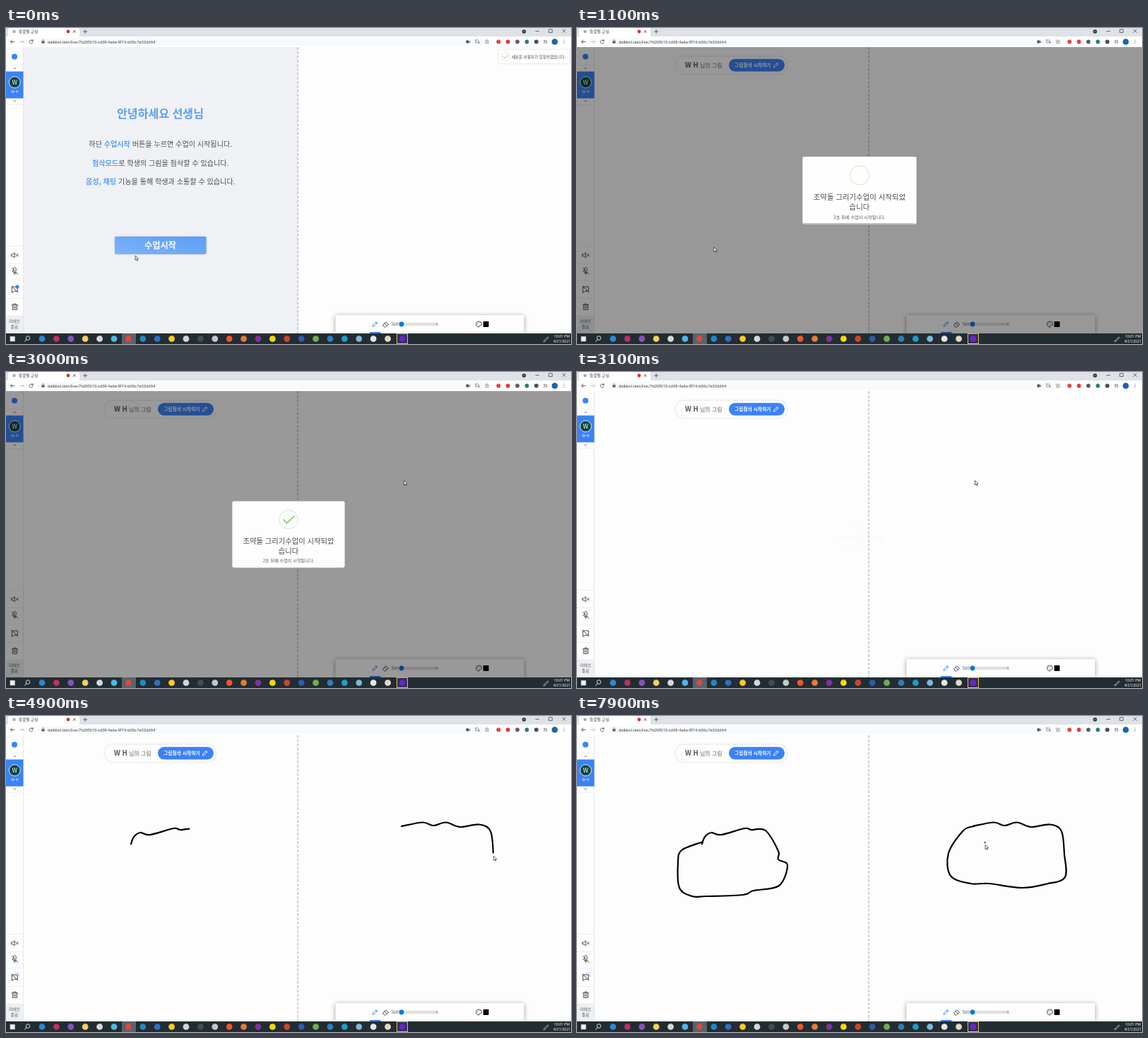
An HTML page that plays this animation: 800 px wide and 447 px high, repeating every 8000 ms.

```html
<!DOCTYPE html>
<html lang="ko">
<head>
<meta charset="utf-8">
<title>Live class</title>
<style>
html, body { margin: 0; height: 100%; overflow: hidden; background: #fdfdfe; }
svg { display: block; width: 100vw; height: 100vh; font-family: 'Noto Sans CJK KR', 'Noto Sans CJK', sans-serif; }
text { white-space: pre; }
.line { fill: none; stroke-linecap: round; stroke-linejoin: round; }
.soft { filter: drop-shadow(0 .8px 1px #0003); }
.deep { filter: drop-shadow(0 1px 3px #0006); }
</style>
</head>
<body>
<svg id="stage" viewBox="0 0 800 447" preserveAspectRatio="none"></svg>
<script>
const BLUE = '#3b82f6', SKY = '#5a9ff0', DARK = '#4a4d52', PAPER = '#fdfdfe', GREEN = '#86cc5c', PALE = '#d3ebc0';

const rect = (x, y, w, h, fill, more = '') =>
  `<rect x="${x}" y="${y}" width="${w}" height="${h}" fill="${fill}" ${more}/>`;
const circle = (x, y, r, fill, more = '') =>
  `<circle cx="${x}" cy="${y}" r="${r}" fill="${fill}" ${more}/>`;
const line = (d, color = DARK, w = 1, more = '') =>
  `<path class="line" d="${d}" stroke="${color}" stroke-width="${w}" ${more}/>`;
// y is the vertical middle of the glyphs
const text = (x, y, size, str, fill = DARK, weight = 400, anchor = 'middle', more = '') =>
  `<text x="${x}" y="${y + size * .38}" font-size="${size}" fill="${fill}" font-weight="${weight}" text-anchor="${anchor}" ${more}>${str}</text>`;
const span = str => `<tspan fill="${SKY}" font-weight="700">${str}</tspan>`;
const pencil = (x, y, color) =>
  line(`M${x - 3} ${y + 3}l.6-2.2 4.4-4.4 1.6 1.6-4.4 4.4zm4-5.6l1.6 1.6`, color, .9);

function browser() {
  const tools = ['#e0483e', '#e23c3c', '#5b5f66', '#2d7d6c', '#4a4d52'];
  return rect(0, 0, 800, 12, '#dee1e6') + rect(3, 0, 101, 13, '#fff', 'rx="2"') + rect(0, 12, 800, 15, '#fff') +
    rect(45, 14, 643, 11, '#f8f9fa', 'rx="5.5"') +
    circle(11.5, 5, 2.3, '#a9adb2') + text(18, 5, 5.6, '들꽃별 교실', '#444', 400, 'start') +
    circle(88, 5, 2.4, '#d93025') + line('M95 3.2l3.4 3.4m0-3.4l-3.4 3.4M109.7 5h5m-2.5-2.5v5', '#444', .8) +
    circle(733.5, 5, 2.8, '#333') + line('M732.3 4.5l1.2 1.2 1.2-1.2', '#fff', .6) +
    line('M750 4.5h4.5M769 2h4.4v4.4h-4.4zM788 2l4.4 4.4m0-4.4l-4.4 4.4', '#333', .7) +
    line('M12 19.5H6.5m2.4-2.4l-2.4 2.4 2.4 2.4', '#555', .9) +
    line('M19.5 19.5h5.5m-2.4-2.4l2.4 2.4-2.4 2.4', '#bbb', .9) +
    line('M37.8 18a2.6 2.6 0 1 0 .3 2.4m0-3.9v1.9h-1.9', '#555', .9) +
    rect(50.5, 18.6, 4, 3, '#555') + line('M51.3 18.6v-.8a1.2 1.2 0 0 1 2.4 0v.8', '#555', .6) +
    text(59, 19.5, 5.85, 'dalkkot.test/live/7b20f615-cd38-4a6e-8f19-b05c7e32d694', '#444', 400, 'start', 'font-family="Roboto, sans-serif"') +
    rect(651.5, 17.5, 4, 4, '#555', 'rx=".6"') + line('M656 19.5l1-1v2z', '#555', .6) +
    line('M665 17h3.5m-3.5 0v4h2m2.5-2.5l1 3-2.5-1z', '#666', .7) +
    line('M681 16.7l.8 1.9 2 .1-1.5 1.3.5 2-1.8-1.1-1.8 1.1.5-2-1.5-1.3 2-.1z', '#666', .6) +
    tools.map((c, i) => circle(697.3 + i * 13.4, 19.5, 2.9, c)).join('') +
    line('M761.5 17.6h4m-4 1.8h4m-4 1.8h2m2.2-1.8v2.4', '#555', .7) +
    circle(777, 19.5, 4.3, '#1f62ad') +
    [17, 19.3, 21.6].map(y => circle(790, y, .6, '#555')).join('');
}

function sidebar() {
  const rules = [52, 108, 308.5, 333, 356.5, 382].map(y => rect(0, y, 24, .6, '#e3e5e8')).join('');
  return rect(0, 27, 24.5, 405, PAPER) + rect(24, 27, .8, 405, '#dfe2e6') + rules +
    circle(12, 40.5, 4, BLUE) +
    line('M11 57.3l1.3-.8 1.3.8M11 103l1.3.8 1.3-.8', '#444', .8) +
    rect(0, 61.5, 24.5, 38, BLUE) + circle(12.3, 76.8, 8, '#0b4743', 'stroke="#e8f3f0"') +
    text(12.3, 76.8, 8.5, 'W', '#fff', 500) + text(12.3, 90.3, 5.4, 'W H', '#fff', 500) +
    line('M8 320h1.8l2.4-2.2v7.2l-2.4-2.2H8zM14.2 319.8l3 3.2m0-3.2l-3 3.2') +
    line('M10.8 342v-1.6a1.7 1.7 0 0 1 3.4 0v3.2M10.8 342.2v1.6a1.7 1.7 0 0 0 2.6 1.4M9 343.4a3.5 3.5 0 0 0 5.5 2.8M12.4 347v1.7M8.3 339.6l8.4 8.7') +
    line('M8.7 366h7.6v6.4h-4.8l-2.8 1.8zM8 365.2l9 8.8') +
    line('M8.3 391.8h8.2m-7.2 0v6.6h6.2v-6.6m-4.6 0v-1.6h3v1.6m-2.5 2v2.8m2 0v-2.8') +
    rect(0, 406.5, 24, 25.5, '#eeeff1') +
    text(12, 415, 5.6, '라이브') + text(12, 423, 5.6, '종료');
}

function welcome() {
  const lines = [
    `하단 ${span('수업시작')} 버튼을 누르면 수업이 시작됩니다.`,
    `${span('첨삭모드')}로 학생의 그림을 첨삭할 수 있습니다.`,
    `${span('음성, 채팅')} 기능을 통해 학생과 소통할 수 있습니다.`];
  return '<g id="welcome">' + rect(24.8, 27, 388, 405, '#eff1f4') +
    text(218.5, 121, 16.1, '안녕하세요 선생님', SKY, 700) +
    lines.map((s, i) => text(218.7, 164.5 + i * 26.3, 10.1, s)).join('') +
    rect(154, 295, 129.5, 25, 'url(#btn)', 'rx="2" class="soft"') +
    text(218.5, 307.3, 12.2, '수업시작', '#fff', 700) + '</g>';
}

function lesson() {
  return '<g id="lesson">' + rect(140, 40.5, 157, 24.5, PAPER, 'rx="11" class="soft"') +
    text(153, 52.5, 9.7, 'W H', '#55585e', 700, 'start') + text(174, 52.5, 8, '님의 그림', '#666', 400, 'start') +
    rect(215, 43.7, 79, 17.8, BLUE, 'rx="8.9"') + text(223, 52.5, 6.75, '그림첨삭 시작하기', '#fff', 700, 'start') +
    pencil(281.5, 52.7, '#fff') + '</g>';
}

function toolbar() {
  return rect(466.5, 406, 267, 26, PAPER, 'class="deep"') +
    pencil(522.3, 419, BLUE) + rect(515, 430, 15.5, 2, BLUE) +
    line('M533.8 419.8l4-4 3.8 3.2-4 4h-1.6zm2-2l3.8 3.3') +
    text(545.5, 419, 5.6, 'Size', '#555', 400, 'start') +
    rect(557, 417.8, 53, 2.4, '#eee', 'rx="1.2" stroke="#999" stroke-width=".5"') + circle(560, 419, 3.4, '#0b75e0') +
    text(610.5, 419, 5.4, '5', '#555') +
    line('M669.5 423a4 4 0 1 1 4-4c0 1.7-1 2-2.5 1.8s-1.8.4-1.4 1.2 0 1-.1 1M667.4 418.8h.1M668.8 417h.1M671 417.2h.1') +
    rect(675.7, 415, 7.8, 8, '#000');
}

function taskbar() {
  const colors = ('2a8ad4 c0305f 8a4fc0 f5cf5a d5d8da 4fb8e8 de4b3c 1e88d0 2f6fc4 ffc928 d8d5da 454c52 c3c8cc ' +
    'f0562a e87b30 80319e f5d90a d04525 2a5db0 6fae4a 2f7fb8 18a0c8 7fb8d8 e4e6e8 e3d8c6 6428c4').split(' ');
  const clock = (y, str) => text(787, y, 5.1, str, '#fff', 400, 'middle', 'font-family="Noto Sans, sans-serif"');
  return rect(0, 432, 800, 15, '#222c33') + rect(164, 432, 20, 15, '#58636c') + rect(5.7, 436.3, 7, 7, '#eee') +
    circle(31, 438.6, 2.8, 'none', 'stroke="#eee" stroke-width=".9"') + line('M29 440.8l-2.4 2.6', '#eee') +
    rect(553.5, 432.3, 15, 14.2, '#3b2a58', 'stroke="#d8cf2a"') +
    colors.map((c, i) => circle(51 + i * 20.4, 439.7, 4.4, '#' + c)).join('') +
    line('M762 442l5-5 1.2 1.2-5 5zm-1 1.4h2', '#ddd', .7) +
    clock(436, '10:01 PM') + clock(443, '4/21/2021');
}

function toast() {
  return '<g id="toast">' + rect(698, 31, 99.5, 19, '#fefeff', 'rx="2" class="soft"') +
    circle(707.3, 40.5, 5.6, 'none', `stroke="${PALE}" stroke-width=".8"`) + line('M704.4 40.7l1.9 2.2 4.3-4.2', GREEN) +
    text(716, 40.5, 5.55, '새로운 사용자가 입장하였습니다.', '#444', 500, 'start') + '</g>';
}

function modal() {
  return '<g id="modal">' + rect(320, 182.5, 160, 94.5, '#fefeff', 'rx="2.5"') +
    circle(400, 208.5, 13.3, 'none', `stroke="${PALE}"`) +
    line('M393 208.7l4.4 5.2 10.6-9.7', GREEN, 1.7, 'id="check" pathLength="1" stroke-dasharray="1 2"') +
    text(400, 238.9, 10.35, '조약돌 그리기수업이 시작되었', '#48494d', 500) +
    text(400, 252.9, 10.35, '습니다', '#48494d', 500) +
    text(400, 267.3, 6.2, '2초 뒤에 수업이 시작됩니다.', '#55565a') +
    rect(320, 275.6, 160, 1.4, '#b9b9bb', 'id="timer"') + '</g>';
}

// Smooth path through a few points
function curve(pts) {
  const at = i => pts[Math.min(pts.length - 1, Math.max(0, i))];
  const lean = (i, k) => [0, 1].map(a => at(i)[a] + k * (at(i + 1)[a] - at(i - 1)[a]) / 6);
  return `M${pts[0]}` + pts.slice(1).map((p, i) => `C${lean(i, 1)} ${lean(i + 1, -1)} ${p}`).join('');
}
const teacherShape = curve([[560, 156], [590, 150.5], [605, 155], [623, 150.5], [643, 157], [670, 153.5], [686, 163],
  [690, 195], [691, 228], [665, 237.5], [630, 243], [583, 237], [557, 237], [529, 226], [526, 194], [547, 162], [562, 156]]);
const studentShape = curve([[177, 181], [181, 171], [190, 165], [204, 168], [237, 159], [247, 161], [267, 162], [285, 191],
  [285, 203], [298, 211], [286, 240], [250, 247], [235, 253], [183, 255], [163, 255], [145, 243], [143, 208], [148, 190], [178, 178]]);

const stage = document.getElementById('stage');
stage.innerHTML =
  '<defs><linearGradient id="btn" x1="0" y1="1" x2="1" y2="0"><stop stop-color="#7db5fa"/><stop offset="1" stop-color="#5b9cf5"/></linearGradient></defs>' +
  rect(0, 27, 800, 405, PAPER) + welcome() + lesson() +
  '<path d="M413.2 27V432" stroke="#bfc3c9" stroke-width="1.5" stroke-dasharray="4 2"/>' +
  sidebar() + circle(16, 366, 2.6, BLUE, 'id="badge"') +
  line(studentShape, '#000', 2.2, 'id="student"') + line(teacherShape, '#000', 2.2, 'id="teacher"') +
  circle(577.5, 179, 1.2, '#555', 'id="spot"') + toolbar() + toast() +
  rect(0, 27, 800, 405, '#000', 'id="shade"') + modal() + browser() + taskbar() +
  '<path id="cursor" d="M0 0v6.4l1.5-1.3 1.1 2.2 1-.5-1-2.2h2z" fill="#fff" stroke="#222" stroke-width=".7"/>';
const el = {};
stage.querySelectorAll('[id]').forEach(e => el[e.id] = e);
const teacherLen = el.teacher.getTotalLength(), studentLen = el.student.getTotalLength();

const OPEN = 975, CLOSE = 3000, DRAW = 3586, DRAWN = 7550;
const ramp = (t, a, b) => Math.min(1, Math.max(0, (t - a) / (b - a)));
const smooth = x => x * x * (3 - 2 * x);
const mix = (a, b, k) => a.map((v, i) => v + (b[i] - v) * k);

// Share of each outline drawn: steady, with one change of pace
const teacherPart = t => .741 * ramp(t, DRAW, 6300) + .259 * ramp(t, 6300, DRAWN);
const studentPart = t => .541 * ramp(t, 3970, 6300) + .459 * ramp(t, 6300, 7300);

function ink(path, len, part) {
  path.style.display = part ? '' : 'none';
  path.setAttribute('stroke-dasharray', `${len * part} ${len * 2}`);
}

function pointer(t) {
  if (t < DRAW) {
    const toButton = mix([183, 322], [194, 310], smooth(ramp(t, 0, 850)));
    const across = mix(toButton, [571, 150], smooth(ramp(t, 1300, 2300)));
    return mix(across, [563.5, 153.5], smooth(ramp(t, 2300, 2700)));
  }
  const p = el.teacher.getPointAtLength(teacherLen * teacherPart(t) + 5);
  return mix([p.x, p.y], [578, 182], smooth(ramp(t, DRAWN, 7850)));
}

function draw(t) {
  const show = (e, on) => e.style.display = on ? '' : 'none';
  const started = t >= OPEN, popup = started && t < CLOSE + 105;
  show(el.welcome, !started);
  show(el.lesson, started);
  show(el.modal, popup);
  show(el.spot, t >= 7850);
  el.toast.style.opacity = 1 - ramp(t, 500, 600);

  const dim = ramp(t, OPEN, OPEN + 100), gone = ramp(t, CLOSE, CLOSE + 105);
  el.shade.style.opacity = .4 * dim * (1 - ramp(t, CLOSE, CLOSE + 95));
  // Pops in with a damped bounce, shrinks away
  const age = t - OPEN;
  const size = 1 - .3 * Math.exp(-age / 90) * Math.cos(age / 75) - .5 * gone;
  el.modal.setAttribute('transform', `translate(400 230) scale(${size}) translate(-400 -230)`);
  el.modal.style.opacity = dim * (1 - gone);
  const tick = ramp(t, OPEN + 405, OPEN + 750);
  show(el.check, tick > 0);
  el.check.setAttribute('stroke-dashoffset', 1 - tick);
  el.timer.setAttribute('width', 160 * (1 - ramp(t, 1060, CLOSE)));

  const p = t % 1000 / 1000;
  el.badge.setAttribute('r', started ? 2 + 2.6 * p : 2.6);
  el.badge.style.opacity = !started ? .55 + .45 * Math.cos(p * 2 * Math.PI)
    : popup ? 0 : .25 * Math.sin(ramp(p, .5, 1) * Math.PI);

  ink(el.teacher, teacherLen, teacherPart(t));
  ink(el.student, studentLen, studentPart(t));
  el.cursor.setAttribute('transform', `translate(${pointer(t)})`);
}

const start = performance.now();
(function frame() {
  draw((performance.now() - start) % 8000);
  requestAnimationFrame(frame);
})();
</script>
</body>
</html>
```
